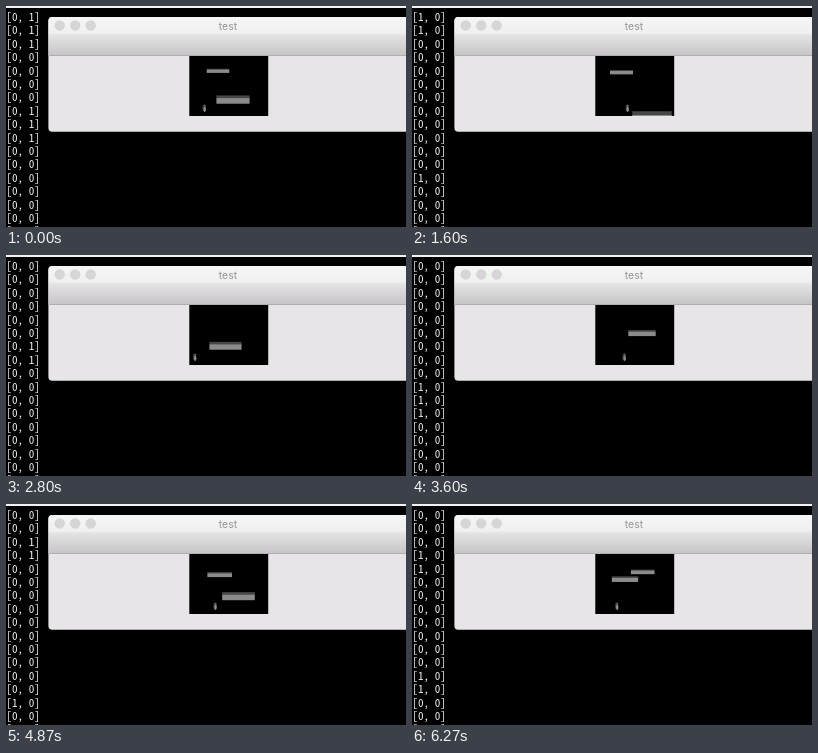
Recreate the animation shown at these times as an HTML page. Size 400x221 px, loop 6.34 s.

```html
<!DOCTYPE html>
<html lang="en">
<head>
<meta charset="utf-8">
<title>test</title>
<style>
  html, body { margin: 0; width: 100%; height: 100%; overflow: hidden; background: #000; }
  svg { display: block; width: 100vw; height: 100vh; }
  .log { font: 11.2px "Noto Sans Mono CJK JP", "Noto Sans Mono CJK SC", monospace; fill: #f0f0f0; white-space: pre; }
  .title { font: 10.5px Inter, sans-serif; fill: #969496; text-anchor: middle; }
</style>
</head>
<body>
<svg viewBox="0 0 400 221">
  <defs>
    <linearGradient id="bar" x2="0" y2="1">
      <stop offset="0" stop-color="#f6f5f6"/>
      <stop offset=".4" stop-color="#f1f0f1"/>
      <stop offset=".48" stop-color="#e3e2e3"/>
      <stop offset="1" stop-color="#c6c4c6"/>
    </linearGradient>
    <clipPath id="view"><rect x="183.3" y="50" width="78.9" height="60"/></clipPath>
  </defs>
  <rect width="400" height="221"/>
  <rect width="400" height="2" fill="#f2f2f2"/>
  <g id="log" class="log"></g>
  <path d="M400 11H46.4q-4 0-4 4V121.7q0 4 4 4H400z" fill="#e7e5e7"/>
  <path d="M400 11H46.4q-4 0-4 4V50H400z" fill="url(#bar)"/>
  <path d="M42.4 49.5H400" stroke="#b0aeb0"/>
  <g fill="#d7d5d7" stroke="#cbc9cb" stroke-width=".5">
    <circle cx="53.7" cy="19.5" r="4.8"/>
    <circle cx="69.2" cy="19.5" r="4.8"/>
    <circle cx="84.7" cy="19.5" r="4.8"/>
  </g>
  <text class="title" x="222" y="23.5">test</text>
  <g clip-path="url(#view)">
    <rect x="183" y="50" width="80" height="60"/>
    <g id="bars"></g>
    <g id="player">
      <ellipse cx="-.5" cy="102" rx="1.5" ry="3.6" fill="#3c3c3c"/>
      <ellipse cx=".2" cy="103.3" rx="1.2" ry="2.9" fill="#8e8e8e"/>
      <circle cx=".3" cy="99.8" r="1" fill="#6a6a6a"/>
    </g>
  </g>
</svg>
<script>
const LOOP = 6340, STEP = 200 / 3, COUNT = 95;
const ROWS = 17, PITCH = 13.4, LINES_PER_STEP = 2;
const HORIZON = 50, NEAR = 12, FAR = 66, SPEED = 0.11;
const $ = id => document.getElementById(id);

function set(el, attrs) {
  for (const key in attrs) el.setAttribute(key, attrs[key]);
  return el;
}
function add(parent, tag, attrs = {}) {
  const el = document.createElementNS("http://www.w3.org/2000/svg", tag);
  return parent.appendChild(set(el, attrs));
}

let seed = 7;
function random() {
  seed = (seed * 16807) % 2147483647;
  return seed / 2147483647;
}

// Key presses come in short runs between longer pauses.
const PAUSE = "[0, 0]", RIGHT = "[0, 1]", LEFT = "[1, 0]";
const log = [];
while (log.length < COUNT * LINES_PER_STEP + ROWS) {
  const press = random() < 0.5 ? RIGHT : LEFT;
  const held = 1 + Math.floor(random() * 3);
  const idle = 2 + Math.floor(random() * 9);
  log.push(...Array(held).fill(press), ...Array(idle).fill(PAUSE));
}

// Each platform: the step it appears at, and its centre x
const PLATFORMS = [
  [-12, 227], [-2.2, 212], [9, 240], [21, 209.5], [30.6, 219.5], [46, 230],
  [54.8, 210], [61.3, 232.5], [67.8, 213.7], [75.1, 211], [87, 213], [90.1, 230.7]
];

// Where the player stands: step, x
const STOPS = [[0, 198.5], [11, 242], [24, 215.5], [42, 189], [65, 233], [80, 190], [94, 205]];

function playerX(step) {
  const i = Math.max(1, STOPS.findIndex(stop => stop[0] >= step));
  const [s0, x0] = STOPS[i - 1], [s1, x1] = STOPS[i];
  const part = (step - s0) / (s1 - s0);
  const run = Math.min(1, Math.max(0, part * 1.5 - 0.25));
  return x0 + (x1 - x0) * run;
}

const lines = Array.from({ length: ROWS }, (_, i) =>
  add($("log"), "text", { x: 0.3, y: 15 + i * PITCH }));

const bars = PLATFORMS.map(([start, cx]) => {
  const g = add($("bars"), "g");
  return {
    start, cx, g,
    trail: add(g, "rect", { fill: "#474747" }),
    body: add(g, "rect", { fill: "#8b8b8b" })
  };
});

// Size and speed grow with the distance from the horizon.
function placeBar({ start, cx, g, trail, body }, step) {
  const depth = NEAR * Math.exp(SPEED * (step - start));
  const shown = depth >= NEAR && depth <= FAR;
  g.style.display = shown ? "" : "none";
  if (!shown) return;
  const width = 17 + depth * 0.36;
  const height = 2 + depth * 0.08;
  const x = cx - width / 2;
  const y = HORIZON + depth - height / 2;
  const tail = depth * 0.06;
  set(trail, { x, width, y: y - tail, height: tail + 0.5 });
  set(body, { x, width, y, height });
}

let last = -1;
function draw() {
  const time = performance.now() % LOOP;
  const step = Math.min(COUNT - 1, Math.floor((time + 5) / STEP));
  if (step !== last) {
    last = step;
    lines.forEach((line, i) => { line.textContent = log[step * LINES_PER_STEP + i]; });
    bars.forEach(bar => placeBar(bar, step));
    set($("player"), { transform: `translate(${playerX(step)} 0)` });
  }
  requestAnimationFrame(draw);
}
draw();
</script>
</body>
</html>
```
